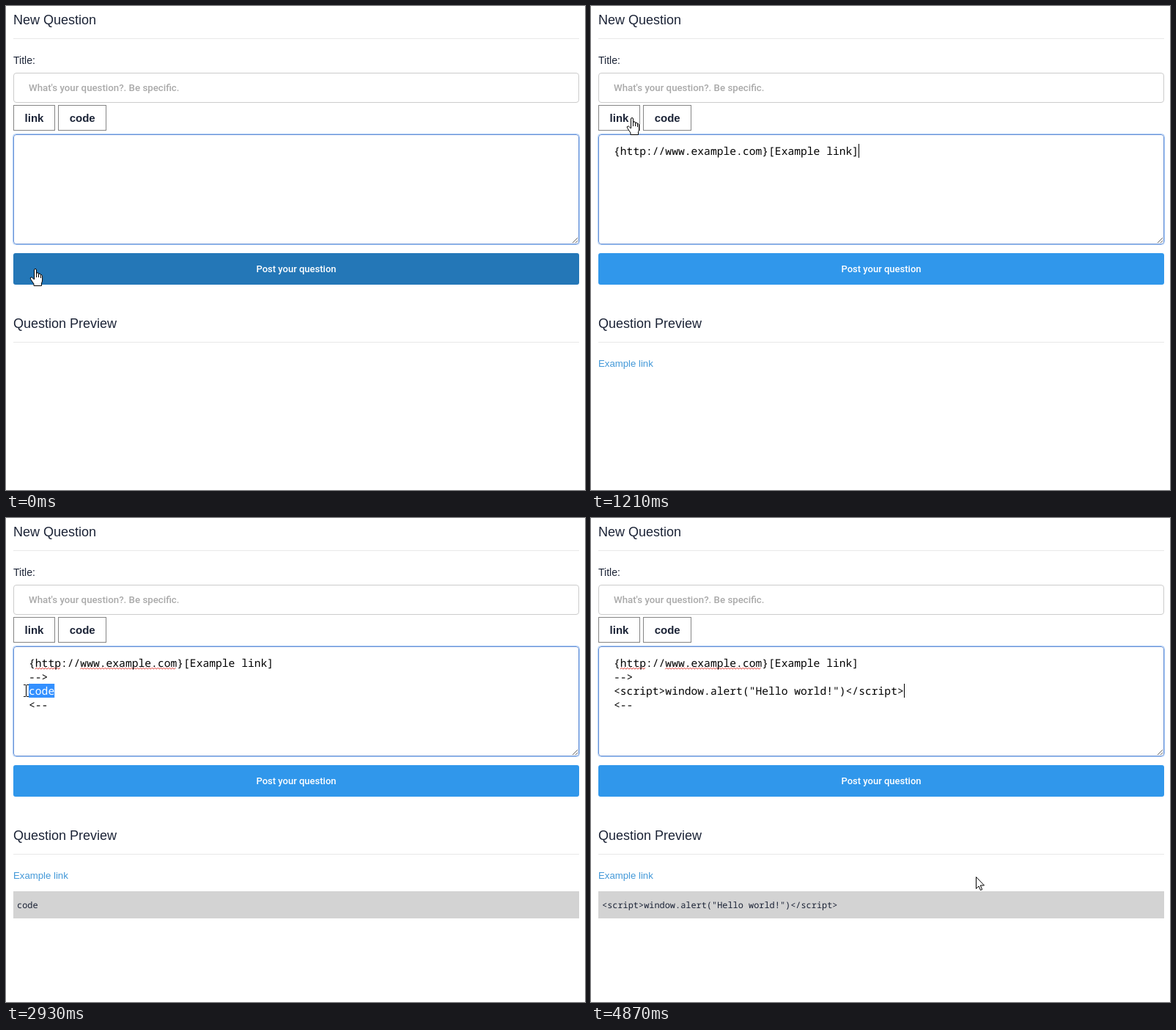
An HTML page that plays this animation: 790x660 px, repeating every 4.95 s.

```html
<!DOCTYPE html>
<html lang="en">
<head>
<meta charset="utf-8">
<title>New Question</title>
<style>
html, body { margin: 0; width: 100%; height: 100%; overflow: hidden; background: #fff; }
svg { display: block; width: 790px; height: 660px; }
text { font-family: "Liberation Sans", Arial, sans-serif; fill: #1b2336; white-space: pre; }
.h { font-size: 18px; }
.b { font-size: 15px; font-weight: bold; }
.f { font-family: Roboto, sans-serif; font-weight: 500; }
.m { font-family: "Noto Sans Mono", Consolas, monospace; text-rendering: geometricPrecision; }
.ed { font-size: 14.66px; fill: #000; }
.box { fill: #fff; stroke: #858585; }
.cur path { stroke: #000; fill: #fff; stroke-linejoin: round; }
</style>
</head>
<body>
<svg viewBox="0 0 790 660">
  <rect width="790" height="660" fill="#fff"/>
  <text class="h" x="10" y="25">New Question</text>
  <text class="h" x="10" y="439">Question Preview</text>
  <path d="M10 44.5H782M10 458.5H782" stroke="#e8e8e8"/>
  <text x="10" y="79" font-size="14">Title:</text>
  <rect x="10.5" y="91.5" width="771" height="40" rx="3.5" fill="#fff" stroke="#ccc"/>
  <text class="f" x="31" y="116" font-size="13.25" style="fill:#a9a9a9">What's your question?. Be specific.</text>
  <rect class="box" x="10.5" y="135.5" width="56" height="34"/>
  <rect class="box" x="71.5" y="135.5" width="65" height="34"/>
  <text class="b" x="25.6" y="158">link</text>
  <text class="b" x="86.7" y="158">code</text>

  <rect id="area" x="10.5" y="175.5" width="771" height="149" rx="3.5" fill="#fff"/>
  <rect id="ring" x="9.5" y="174.5" width="773" height="151" rx="4" fill="none" stroke="#a9cbf5"/>
  <path d="M773 323L780 316M777 323L780 320" stroke="#666" fill="none"/>
  <path id="wave" fill="none" stroke="#e0342c" stroke-width="1"/>
  <rect id="sel" y="226" height="19" fill="#3390ff"/>
  <g id="lines"></g>
  <text id="selText" class="m ed" y="241" style="fill:#fff"></text>
  <rect id="caret" width="1" height="19" fill="#000"/>

  <rect id="post" x="10" y="337" width="772" height="43" rx="3"/>
  <text class="f" x="396" y="363" font-size="13" text-anchor="middle" style="fill:#fff">Post your question</text>

  <text id="link" x="10" y="492" font-size="13.2" style="fill:#4298d8">Example link</text>
  <g id="pre">
    <rect x="10" y="509" width="772" height="37" fill="#d3d3d3"/>
    <text id="preText" class="m" x="15" y="532" font-size="11.91"></text>
  </g>

  <g id="cursor" class="cur">
    <path id="hand" d="M-1.5 14V2Q-1.5 .5 0 .5Q1.5 .5 1.5 2V9V7Q1.6 5.7 3 5.7Q4.5 5.7 4.5 7.5V10V8Q4.6 7 6 7Q7.4 7 7.5 9V11V9.5Q7.7 8.5 8.7 8.6Q9.6 8.8 9.6 11V16Q9.5 18 8.5 20V23.5H-2V21L-6.4 14.5Q-7.4 12.5 -6 12Q-4.5 11.5 -3 13.5L-1.5 15Z M1.5 8V12M4.5 9V12M7.5 10V13"/>
    <path id="beam" d="M-3 -7.5H0M1 -7.5H4M-3 8.5H0M1 8.5H4M.5 -7V8" style="fill:none"/>
    <path id="arrow" d="M.5 .5V16.5L4 13L6.5 18.5L8.7 17.5L6.3 12H11.5Z"/>
  </g>
</svg>
<script>
const $ = id => document.getElementById(id);
const LOOP = 4950, CH = 8.797, LEFT = 31;
const LINK = '{http://www.example.com}[Example link]';
const SCRIPT = '<script>window.alert("Hello world!")<\/script>';

// start, end, number of steps, points along the way
const moves = [
  [70, 590, 8, [[40, 358], [52, 152]]],
  [1150, 1460, 5, [[52, 152], [93, 149]]],
  [1930, 2390, 7, [[93, 149], [103, 158], [104, 184], [101, 219], [93, 245], [85, 247], [76, 244], [70, 240]]],
  [2470, 2930, 7, [[70, 240], [27, 235]]],
  [4170, 4640, 7, [[27, 235], [106, 156]]],
  [4700, 4870, 3, [[106, 156], [525, 489]]]
];
const carets = [[760, 1260], [1760, 2240], [3690, 4170], [4700, LOOP]];

const rows = [0, 1, 2, 3].map(i => {
  const el = document.createElementNS('http://www.w3.org/2000/svg', 'text');
  el.setAttribute('class', 'm ed');
  el.setAttribute('x', LEFT);
  el.setAttribute('y', 203 + 19 * i);
  $('lines').append(el);
  return el;
});

function wavy(from, count) {
  const x0 = LEFT + from * CH, end = x0 + count * CH;
  let d = `M${x0} 206.2`;
  for (let x = x0 + 2, up = true; x <= end; x += 2, up = !up) d += `L${x} ${up ? 204.2 : 206.2}`;
  return d;
}
$('wave').setAttribute('d', wavy(1, 4) + wavy(8, 15));

const set = (id, attrs) => { for (const k in attrs) $(id).setAttribute(k, attrs[k]); };
const show = (id, on) => $(id).setAttribute('visibility', on ? 'visible' : 'hidden');
const within = (t, a, b) => t >= a && t < b;

function along(pts, p) {
  if (pts.length === 2) p = p * p * (3 - 2 * p);
  const s = p * (pts.length - 1), i = Math.min(Math.floor(s + 1e-6), pts.length - 2), f = s - i;
  return [0, 1].map(k => Math.round(pts[i][k] + (pts[i + 1][k] - pts[i][k]) * f));
}

function pointer(t) {
  let pos = moves[0][3][0];
  for (const [a, b, n, pts] of moves) {
    if (t < a) break;
    const k = Math.floor((t - a) / (b - a) * (n - 1) + 1e-6) + 1;
    pos = along(pts, Math.min(1, k / n));
  }
  return pos;
}

function shapeAt(x, y) {
  const inside = (l, t, r, b) => x >= l && x < r && y >= t && y < b;
  if (inside(10, 337, 782, 380) || inside(10, 135, 67, 170) || inside(71, 135, 137, 170)) return 'hand';
  return inside(10, 175, 782, 325) || inside(10, 91, 782, 132) ? 'beam' : 'arrow';
}

function draw(t) {
  const [x, y] = pointer(t);
  const shape = shapeAt(x, y);
  set('cursor', { transform: `translate(${x} ${y})` });
  for (const s of ['hand', 'beam', 'arrow']) show(s, s === shape);
  set('post', { fill: shape === 'hand' && y > 330 ? '#2477b7' : '#3097eb' });

  const focus = !within(t, 690, 760) && !within(t, 1690, 1760);
  set('area', { stroke: focus ? '#6c93d6' : '#999' });
  show('ring', focus);

  const hasLink = t >= 760, hasCode = t >= 1760;
  const body = t >= 3690 ? SCRIPT : 'code';
  const text = [hasLink ? LINK : '', ...(hasCode ? ['-->', body, '<--'] : ['', '', ''])];
  rows.forEach((r, i) => { r.textContent = text[i]; });
  show('wave', within(t, 1260, 1760) || t >= 2540);
  show('link', hasLink);
  show('pre', hasCode);
  $('preText').textContent = body;

  // leftward drag over the word
  const end = LEFT + 4 * CH;
  const n = within(t, 2470, 3690) ? Math.max(0, Math.min(4, Math.round((end - x) / CH))) : 0;
  set('sel', { x: end - n * CH, width: n * CH });
  set('selText', { x: end - n * CH });
  $('selText').textContent = n ? 'code'.slice(4 - n) : '';
  rows[2].textContent = n ? 'code'.slice(0, 4 - n) : text[2];

  const row = t >= 3690 ? 2 : hasCode ? 3 : 0;
  set('caret', { x: Math.round(LEFT + text[row].length * CH), y: 188 + 19 * row });
  show('caret', carets.some(([a, b]) => within(t, a, b)));
}

const begin = performance.now();
function tick() {
  draw((performance.now() - begin) % LOOP);
  requestAnimationFrame(tick);
}
draw(0);
requestAnimationFrame(tick);
</script>
</body>
</html>
```
